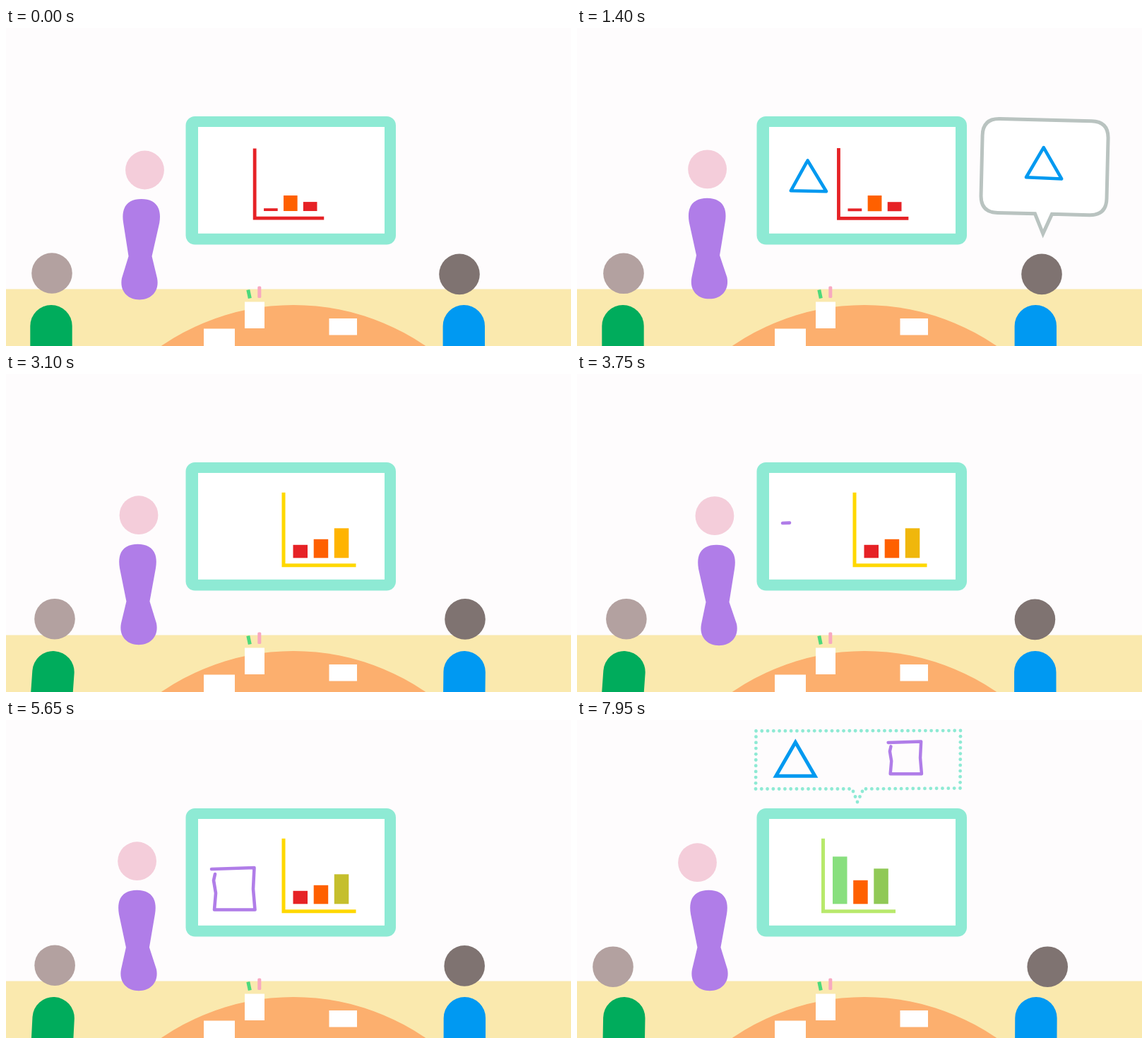
Write an HTML page that moves like this. It is 800x450 px and loops after 8000 ms.

```html
<!DOCTYPE html>
<html lang="en">
<head>
<meta charset="utf-8">
<title>Meeting</title>
<style>
html, body { margin: 0; width: 100%; height: 100%; overflow: hidden; background: #fefcfd; }
svg { display: block; width: 100vw; height: 100vh; }
.line { fill: none; stroke-width: 4.6; stroke-linecap: round; stroke-linejoin: round; }
.blue { stroke: #0099f0; }
.violet { stroke: #b07de8; }
</style>
</head>
<body>
<svg viewBox="0 0 800 450">
  <defs>
    <path id="tri" d="M326.5 187.5L353 231.3L302.8 230.3Z"/>
    <path id="box" d="M291 211L351.500 209L350 239L352.500 268.500L295 268.500L297 245L294 227L296 218"/>
    <path id="seat" d="M-29.700 40V-28.300A29.700 29.700 0 0 1 29.700 -28.300V40Z"/>
    <linearGradient id="blur">
      <stop offset="0" stop-color="#999" stop-opacity=".25"/>
      <stop offset=".8" stop-color="#777" stop-opacity=".9"/>
      <stop offset="1" stop-color="#999" stop-opacity=".2"/>
    </linearGradient>
  </defs>
  <rect width="800" height="450" fill="#fefcfd"/>
  <rect y="369.500" width="800" height="81" fill="#fae9ae"/>

  <rect x="254.500" y="125" width="297.500" height="181.500" rx="13" fill="#8eead4"/>
  <rect x="272" y="140" width="264" height="150.800" fill="#fff"/>
  <g id="chart">
    <path id="axis" d="M-50 -52.500V50.500H52.500" fill="none" stroke-width="5"/>
    <rect class="bar" x="-36.500" width="20.500"/>
    <rect class="bar" x="-7.300" width="20.500"/>
    <rect class="bar" x="21.800" width="20.500"/>
  </g>
  <use id="drawnTri" href="#tri" class="line blue"/>
  <use id="drawnBox" href="#box" class="line violet"/>
  <path id="pen" d="M270 225.500L289 229V234L270 237Z" fill="url(#blur)"/>

  <path id="torso" fill="#b07de8"/>
  <circle id="face" r="27.400" fill="#f4cdda"/>

  <circle cx="407" cy="723" r="331" fill="#fcaf6e"/>
  <path d="M342.800 370.500L345.300 382.500" stroke="#4cd97b" stroke-width="5"/>
  <rect x="356.300" y="365.500" width="5" height="16.500" rx="1.500" fill="#f8a8c0"/>
  <path d="M338 387.500h28v37.500h-28zM280 425.500h44V450h-44zM457.500 411h39.500v23.500h-39.500z" fill="#fff"/>

  <use id="leftBody" href="#seat" fill="#00ac5c"/>
  <circle id="leftHead" r="28.800" fill="#b3a1a0"/>
  <use id="rightBody" href="#seat" fill="#0099f2"/>
  <circle id="rightHead" r="28.800" fill="#7f7371"/>

  <g id="speech">
    <path d="M0 0L-12 -28H-65Q-89 -28 -89 -52V-137Q-89 -161 -65 -161H65Q89 -161 89 -137V-52Q89 -28 65 -28H12Z"
      fill="#fff" stroke="#b9c3c0" stroke-width="5"/>
    <use href="#tri" class="line blue" transform="translate(-328.500 -309.500)"/>
  </g>

  <g id="thought">
    <g id="dots" fill="#8eead4"></g>
    <path d="M309.300 31.500L281.700 79.300H337Z" fill="none" stroke="#0099f0" stroke-width="5"/>
    <use href="#box" class="line violet" style="stroke-width:5.800" transform="translate(440.600 32) scale(.77) translate(-291 -211)"/>
  </g>
</svg>
<script>
const LOOP = 8000;
const RED = [230, 34, 38], YELLOW = [255, 216, 0], AMBER = [255, 180, 0];
const LIME = [184, 233, 108], MINT = [136, 223, 126], GREEN = [144, 201, 86];

const $ = id => document.getElementById(id);
const bars = [...document.querySelectorAll('.bar')];
const set = (el, attrs) => { for (const k in attrs) el.setAttribute(k, attrs[k]); };
const show = (el, on) => { el.style.display = on ? '' : 'none'; };
const part = (t, a, b) => Math.min(1, Math.max(0, (t - a) / (b - a)));
const ramp = (t, a, b) => { const p = part(t, a, b); return p * p * (3 - 2 * p); };
const hump = (t, a, b) => Math.sin(Math.PI * part(t, a, b));
const mix = (a, b, p) => a.map((v, i) => v + (b[i] - v) * p);
const rgb = c => `rgb(${c.map(Math.round)})`;

// Grows from 0 to 1 with a small overshoot.
function pop(t, a, b) {
  const q = part(t, a, b) - 1;
  return 1 + 2.7 * q ** 3 + 1.7 * q * q;
}

// Evenly spaced dots along each edge of a line.
function dotted(points, gap) {
  let html = '';
  points.slice(1).forEach(([x2, y2], i) => {
    const [x1, y1] = points[i];
    const n = Math.round(Math.hypot(x2 - x1, y2 - y1) / gap);
    for (let k = 0; k < n; k++)
      html += `<circle cx="${x1 + (x2 - x1) * k / n}" cy="${y1 + (y2 - y1) * k / n}" r="2.4"/>`;
  });
  return html;
}
$('dots').innerHTML = dotted([
  [253.5, 15.5], [543, 15], [542.5, 96.5], [409, 97.5], [404, 101],
  [397, 116], [391, 101], [385.5, 97.5], [253, 97.5], [253.5, 15.5]
], 8.2);

// Built from the hip centre; the upper half leans from the waist.
function torso(hip, y, lean) {
  const sx = hip + lean, wx = hip + lean / 2 - 0.3;
  const w = y + 81, b = y + 142.5;
  return `M${wx - 16.5} ${w}L${sx - 25.5} ${y + 34}` +
    `C${sx - 29.5} ${y + 10} ${sx - 18} ${y} ${sx} ${y}` +
    `C${sx + 18} ${y} ${sx + 29.5} ${y + 10} ${sx + 25.5} ${y + 34}` +
    `L${wx + 16.5} ${w}L${hip + 25} ${y + 112}` +
    `C${hip + 28.5} ${y + 130} ${hip + 17} ${b} ${hip} ${b}` +
    `C${hip - 17} ${b} ${hip - 28.5} ${y + 130} ${hip - 25} ${y + 112}Z`;
}

function person(side, x, y, bodyX, tilt) {
  set($(side + 'Head'), { cx: x, cy: y });
  set($(side + 'Body'), { transform: `translate(${bodyX} 450) rotate(${tilt})` });
}

// Draws an outline, then lets it shrink into the chart.
function sketch(el, path, drawn, merged, cx, cy) {
  const len = path.getTotalLength();
  show(el, drawn > 0 && merged < 1);
  el.style.strokeDasharray = drawn < 1 ? `${len * drawn} ${len * 2}` : 'none';
  set(el, { transform: `translate(${cx + 90 * merged} ${cy}) scale(${1 - merged}) translate(${-cx} ${-cy})` });
}

function draw(t) {
  const e = (a, b) => ramp(t, a, b);
  const turn = e(0, 900), settle = e(900, 2000), attend = e(2000, 3100);
  const watch = e(3100, 4500), relax = e(4500, 6700), lookUp = e(6900, 7950);

  // Presenter
  const walk = e(3400, 4200) - e(4480, 5300);
  const hip = 189 - 2 * turn + settle + 32 * walk;
  const lean = 2.7 - 7.2 * turn + 3 * settle - 5 * walk - 2 * relax + 2 * lookUp;
  const gaze = 4.8 - 5.3 * turn + 2 * settle - 10 * walk - 2.5 * relax - 15 * lookUp;
  const top = 242 - turn - 0.3 * settle + 2.3 * walk;
  set($('face'), { cx: hip + lean + gaze, cy: top - 41 + 2 * lookUp });
  set($('torso'), { d: torso(hip, top, lean) });

  // Listeners
  person('left',
    65 + turn + 3 * attend + 2 * watch - 3.5 * relax - 16.500 * lookUp,
    347 + 0.7 * settle - attend + relax + 1.500 * lookUp,
    64 + turn + 1.3 * relax,
    4 * attend - 2 * relax - lookUp);
  const speak = e(350, 900), glance = e(6700, 7550);
  person('right',
    642 + 17.500 * speak - 9.500 * e(900, 2900) - 3.500 * watch + 5 * relax + 14.700 * glance,
    348.4 - 1.500 * attend + watch + 1.300 * glance,
    648.3 + speak - 0.500 * attend + relax,
    0.7 * attend - 1.700 * watch + 2 * relax - 0.700 * glance);

  // Chart
  const slide = e(1150, 1700), first = e(2500, 3000), second = e(5950, 6550);
  const scale = 0.957 - 0.019 * turn + 0.062 * slide + 0.1 * (hump(t, 2550, 3000) + hump(t, 5950, 6550));
  const cx = 400 + 43 * slide - 44.5 * second;
  const cy = 220.3 + 10 * Math.max(0, 1 - scale);
  set($('chart'), { transform: `translate(${cx} ${cy}) scale(${scale})` });
  set($('axis'), { stroke: rgb(mix(mix(RED, YELLOW, first), LIME, second)) });
  const fills = [
    rgb(mix(RED, mix(LIME, MINT, part(t, 6050, 7950)), second)),
    '#ff6000',
    rgb(mix(mix(RED, AMBER, first), GREEN, part(t, 3100, 7950)))
  ];
  const heights = mix(mix([4, 23, 13.5], [18.5, 26.5, 42], first), [67, 33.5, 50], second);
  heights.forEach((h, i) => set(bars[i], { y: 40 - h, height: h, fill: fills[i] }));

  sketch($('drawnTri'), $('tri'), e(775, 1455), e(2400, 2750), 328, 212);
  sketch($('drawnBox'), $('box'), e(3650, 4450), e(5800, 6150), 322, 239);
  show($('pen'), t >= 4450 && t < 4600);
  set($('pen'), { transform: `translate(${Math.min(0, (4500 - t) / 10)})` });

  // Bubbles
  const size = pop(t, 350, 1000) * (1 - e(2250, 2500));
  const drift = 1 - settle;
  show($('speech'), size > 0);
  set($('speech'), {
    transform: `translate(${654 + 10.2 * drift} ${290.5 + drift}) rotate(${4.9 * drift - 1.4}) scale(${size})`
  });
  const thought = pop(t, 6900, 7450);
  show($('thought'), thought > 0);
  set($('thought'), { transform: `translate(397 116) scale(${thought}) translate(-397 -116)` });
}

const begin = performance.now();
function tick() {
  draw((performance.now() - begin) % LOOP);
  requestAnimationFrame(tick);
}
tick();
</script>
</body>
</html>
```
